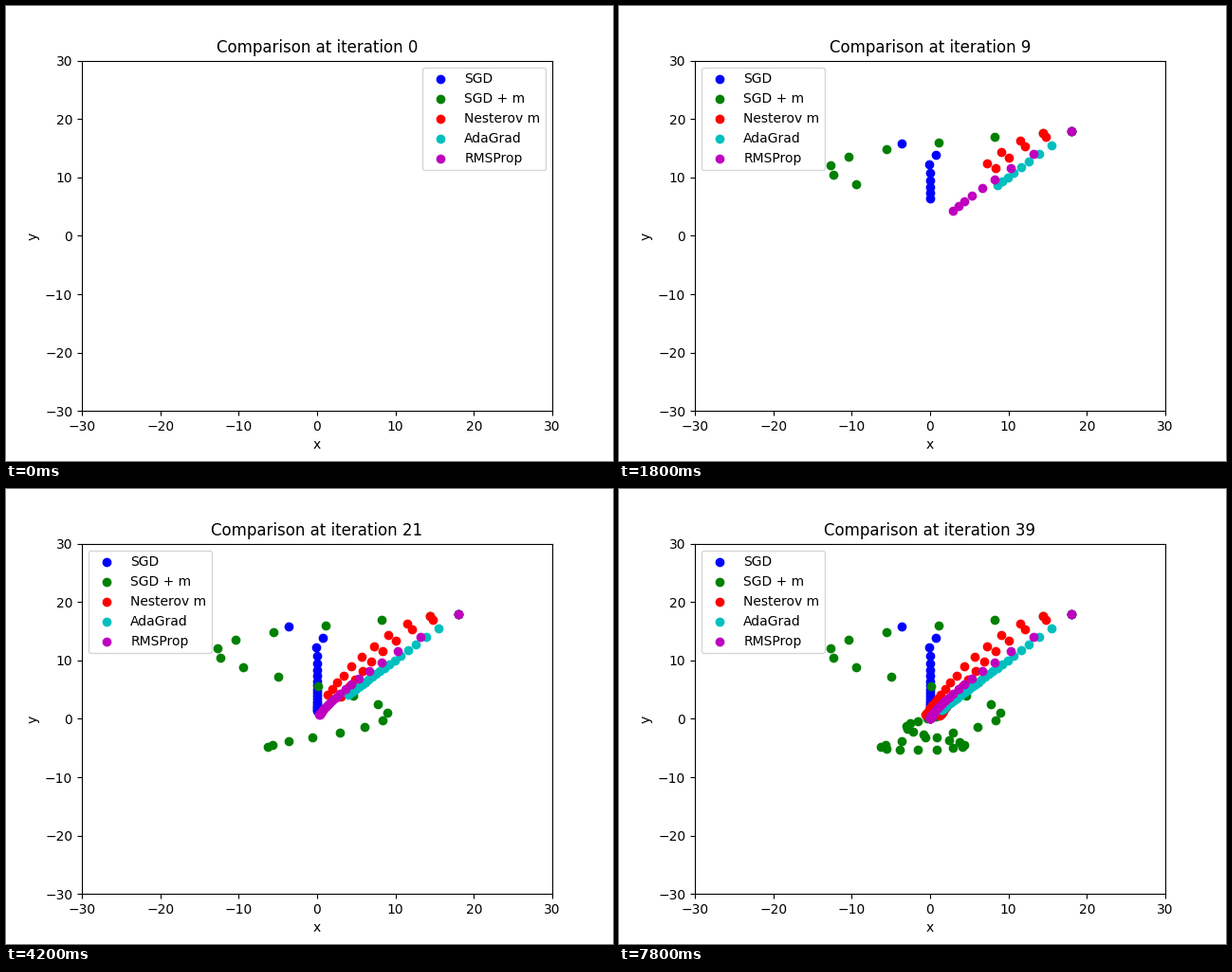
Animation of 640x480 px, one loop 8 s. Source, as a matplotlib script:

```python
import numpy as np
import matplotlib.pyplot as plt
from matplotlib.animation import FuncAnimation

FRAMES = 40
INTERVAL = 200
START = np.array([18.0, 18.0])
MU = 0.9
EPS = 0.1


def grad(p):
    """Gradient of x**2 + 0.1 * y**2."""
    return np.array([2.0, 0.2]) * p


def sgd(p, s, lr=0.6):
    return p - lr * grad(p), s


def momentum(p, v, lr=0.1):
    v = MU * v + grad(p)
    return p - lr * v, v


def nesterov(p, v, lr=0.1):
    v = MU * v + grad(p - MU * v)
    return p - lr * v, v


def adagrad(p, c, lr=2.5):
    g = grad(p)
    c = c + g ** 2
    return p - lr * g / (np.sqrt(c) + EPS), c


def rmsprop(p, c, lr=0.5, decay=0.99):
    g = grad(p)
    c = decay * c + (1 - decay) * g ** 2
    return p - lr * g / (np.sqrt(c) + EPS), c


def trace(step):
    p, state = START, np.zeros(2)
    path = []
    for _ in range(FRAMES):
        path.append(p)
        p, state = step(p, state)
    return np.array(path)


METHODS = [
    ("SGD", "b", sgd),
    ("SGD + m", "g", momentum),
    ("Nesterov m", "r", nesterov),
    ("AdaGrad", "c", adagrad),
    ("RMSProp", "m", rmsprop),
]
paths = [(label, color, trace(step)) for label, color, step in METHODS]

fig, ax = plt.subplots(figsize=(6.4, 4.8), dpi=100)


def draw(i):
    ax.clear()
    for label, color, path in paths:
        ax.scatter(path[:i, 0], path[:i, 1], c=color, label=label)
    ax.set(xlim=(-30, 30), ylim=(-30, 30), xlabel="x", ylabel="y",
           title=f"Comparison at iteration {i}")
    ax.legend(loc="best")


anim = FuncAnimation(fig, draw, frames=FRAMES, interval=INTERVAL, repeat=True)
plt.show()
```
